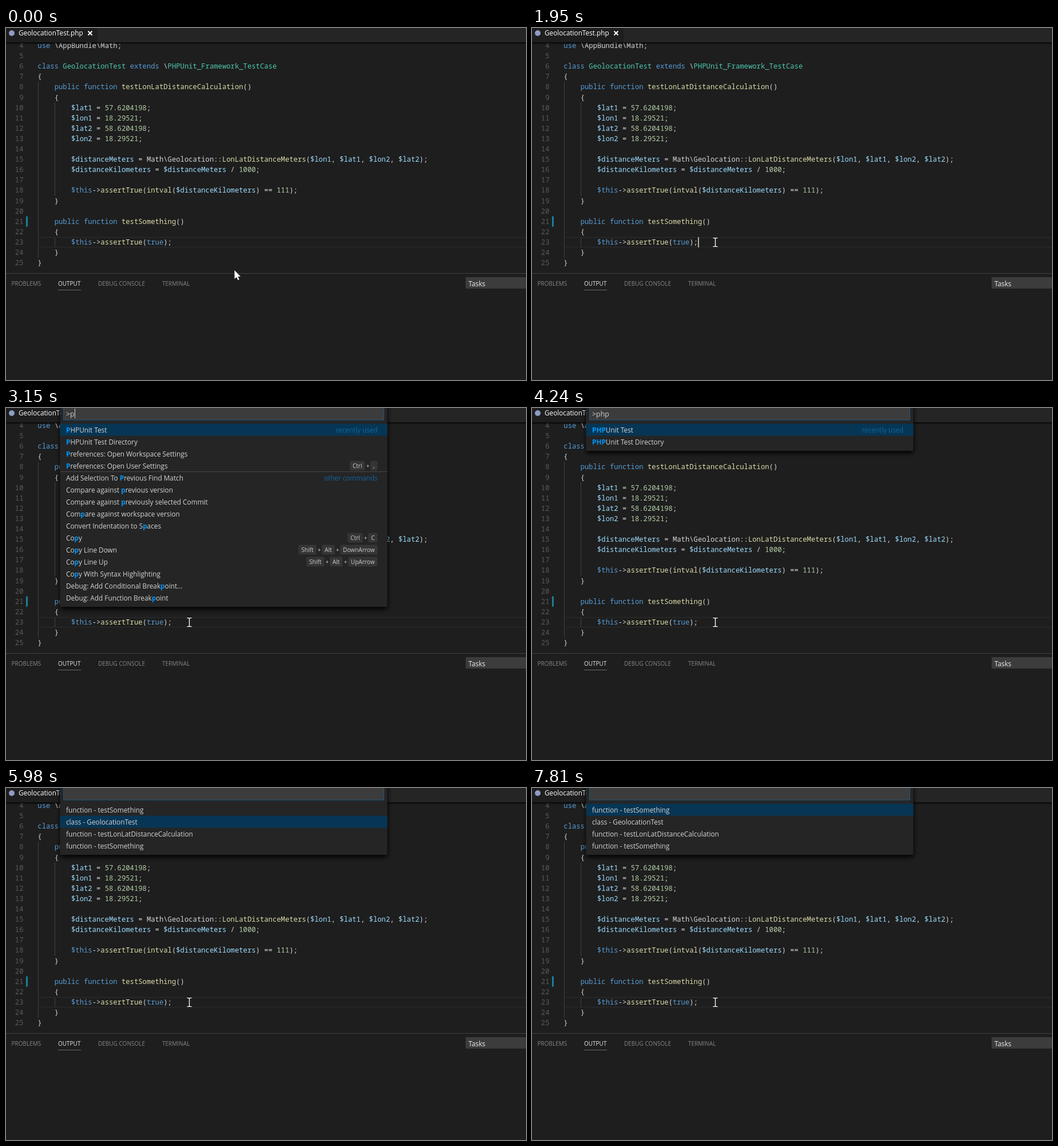
An HTML page with a canvas that plays this animation: 909x616 px, repeating every 8 s.

```html
<!DOCTYPE html>
<html lang="en">
<head>
<meta charset="utf-8">
<title>Editor test runner</title>
<style>
html, body { margin: 0; width: 100%; height: 100%; overflow: hidden; background: #1e1e1e; }
canvas { display: block; }
</style>
</head>
<body>
<canvas width="909" height="616"></canvas>
<script>
const LOOP = 8000;
const c = document.querySelector('canvas').getContext('2d');
const MONO = '12.222px "Noto Sans Mono", monospace';
const ui = (size, weight = 400) => `${weight} ${size}px "Open Sans", sans-serif`;

const FIRST_LINE = 4;
const CODE = String.raw`use \AppBundle\Math;

class GeolocationTest extends \PHPUnit_Framework_TestCase
{
    public function testLonLatDistanceCalculation()
    {
        $lat1 = 57.6204198;
        $lon1 = 18.29521;
        $lat2 = 58.6204198;
        $lon2 = 18.29521;

        $distanceMeters = Math\Geolocation::LonLatDistanceMeters($lon1, $lat1, $lon2, $lat2);
        $distanceKilometers = $distanceMeters / 1000;

        $this->assertTrue(intval($distanceKilometers) == 111);
    }

    public function testSomething()
    {
        $this->assertTrue(true);
    }
}`.split('\n');

// Groups: keyword, variable, class, function, number
const TOKEN = /(\b(?:use|class|extends|public|function|true)\b|\$this)|(\$\w+)|(GeolocationTest|PHPUnit_\w+)|(\w+(?=\())|(\b\d[\d.]*)|\w+|[^]/g;
const TOKEN_COLORS = ['#569cd6', '#9cdcfe', '#4ec9b0', '#dcdcaa', '#b5cea8'];

// Asterisks mark the matched letters
const COMMANDS = [
  ['*P*HPUnit Test'],
  ['*P*HPUnit Test Directory'],
  ['*P*references: Open Workspace Settings'],
  ['*P*references: Open User Settings', 'Ctrl', ','],
  ['Add Selection To *P*revious Find Match'],
  ['Compare against *p*revious version'],
  ['Compare against *p*reviously selected Commit'],
  ['Com*p*are against workspace version'],
  ['Convert Indentation to S*p*aces'],
  ['Co*p*y', 'Ctrl', 'C'],
  ['Co*p*y Line Down', 'Shift', 'Alt', 'DownArrow'],
  ['Co*p*y Line Up', 'Shift', 'Alt', 'UpArrow'],
  ['Co*p*y With Syntax Highlighting'],
  ['Debug: Add Conditional Break*p*oint...'],
  ['Debug: Add Function Break*p*oint']
];
const ALL = COMMANDS.map(([label, ...keys]) => [label.replaceAll('*', ''), ...keys]);
const MATCHES = [['*PHP*Unit Test'], ['*PHP*Unit Test Directory']];
const TESTS = [
  ['function - testSomething'], ['class - GeolocationTest'],
  ['function - testLonLatDistanceCalculation'], ['function - testSomething']
];

function rect(x, y, w, h, color) {
  c.fillStyle = color;
  c.fillRect(x, y, w, h);
}

function text(s, x, y, color, font, align = 'left') {
  c.font = font;
  c.fillStyle = color;
  c.textAlign = align;
  c.fillText(s, x, y);
  return x + c.measureText(s).width;
}

// Value of the last [time, value] step that has been reached
const at = (t, steps) => steps.filter(s => s[0] <= t).pop()[1];

function drawCode(caret) {
  rect(56, 94, 1, 308, '#404040');
  rect(85, 130, 1, 164, '#404040');
  rect(56, 366, 853, 1, '#2c2c2c');
  rect(56, 383, 853, 1, '#2c2c2c');
  rect(85, 367, 1, 16, '#404040');
  rect(35, 329.5, 3, 18, '#1b8098');
  CODE.forEach((line, i) => {
    const y = Math.round(35 + i * 18.1);
    text(i + FIRST_LINE, 30.5, y, '#5a5a5a', MONO, 'right');
    for (const m of line.matchAll(TOKEN)) {
      const kind = m.slice(1).findIndex(Boolean);
      text(m[0], 55.3 + m.index * 7.333, y, TOKEN_COLORS[kind] || '#d4d4d4', MONO);
    }
  });
  if (caret) rect(290, 366, 2, 18, '#aeafad');
}

function drawTabs() {
  rect(0, 0, 909, 25, '#252526');
  rect(0, 0, 160, 25, '#1e1e1e');
  const shade = c.createLinearGradient(0, 25, 0, 29);
  shade.addColorStop(0, '#000c');
  shade.addColorStop(1, '#0000');
  rect(0, 25, 909, 4, shade);
  c.fillStyle = '#8d9cc4';
  c.beginPath();
  c.arc(10, 9, 5, 0, 7);
  c.fill();
  text('GeolocationTest.php', 22, 13, '#fff', ui(11.75));
  c.strokeStyle = '#fff';
  c.lineWidth = 2;
  c.stroke(new Path2D('M143.5 5.5l7 7m0-7l-7 7'));
}

function drawPanel() {
  rect(0, 429, 909, 1, '#424242');
  [['PROBLEMS', 9.5], ['OUTPUT', 91], ['DEBUG CONSOLE', 161], ['TERMINAL', 273]].forEach(([s, x], i) =>
    text(s, x, 451, i == 1 ? '#e7e7e7' : '#858585', ui(10)));
  rect(91, 458, 40, 1, '#686868');
  rect(803.5, 436, 106, 20, '#3c3c3c');
  text('Tasks', 808.5, 452, '#f0f0f0', ui(11.75));
}

function drawKeys(keys, y) {
  let x = 649.5;
  keys.slice().reverse().forEach((key, i) => {
    if (i) {
      text('+', x - 4.5, y + 4, '#ccc', ui(10), 'center');
      x -= 9.5;
    }
    c.font = ui(10.1);
    const w = c.measureText(key).width + 10;
    x -= w;
    c.fillStyle = '#353536';
    c.beginPath();
    c.roundRect(x, y - 8.5, w, 17, 2.5);
    c.fill();
    text(key, x + 5, y + 4, '#ccc', ui(10.1));
  });
}

function drawPalette({ input, rows, selected, caret, scrollbar }) {
  const bottom = 33 + rows.length * 21;
  c.save();
  c.shadowColor = '#000';
  c.shadowBlur = 8;
  c.shadowOffsetY = 4;
  rect(94.5, -10, 572, bottom + 10, '#252526');
  c.restore();
  rect(100, -5, 561, 26.5, '#1c587f');
  rect(101, -5, 559, 25.5, '#3c3c3c');
  const end = text(input, 105, 15, '#ccc', ui(12.4));
  if (caret) rect(Math.round(end), 1, 1, 17, '#ccc');
  rect(94.5, 27.5 + selected * 21, 572, 21, '#073655');

  rows.forEach(([label, ...keys], i) => {
    const y = 38 + i * 21;
    let x = 105;
    label.split('*').forEach((part, j) => {
      x = text(part, x, y + 5, j % 2 ? '#0097fb' : '#d4d4d4', ui(11.8, j % 2 ? 700 : 400));
    });
    drawKeys(keys, y);
  });
  const group = (s, y) => text(s, 649.5, y, '#0f659f', ui(11.7), 'right');
  if (rows != TESTS) group('recently used', 43);
  if (rows.length > 4) {
    rect(94.5, 111, 572, 1, '#47474a');
    group('other commands', 127);
  }
  if (scrollbar) rect(658, 27.5, 8.5, 18, `rgba(121,121,121,${scrollbar})`);
}

function drawPointer(t) {
  if (t < 120) {
    c.fillStyle = '#fff';
    c.fill(new Path2D('M399.5 424v15l3.5-3 2.6 5.2 2.2-1-2.5-5.2h4.7z'));
    return;
  }
  // Six steps along a curve that rises a little above its end
  const p = Math.min(1, (Math.floor((t - 120) / 108) + 1) / 6);
  const x = Math.round(400 - 80 * p * (2 - p)) + .5;
  const y = Math.round(425 - 50 * p - 104 * p * (1 - p)) + .5;
  const beam = new Path2D(`M${x - 4} ${y - 8}h3l1 1 1-1h3M${x} ${y - 7}v14M${x - 4} ${y + 7}h3l1-1 1 1h3`);
  c.strokeStyle = '#000';
  c.lineWidth = 3;
  c.stroke(beam);
  c.strokeStyle = '#fff';
  c.lineWidth = 1.5;
  c.stroke(beam);
}

function paletteAt(t) {
  if (t < 2610 || t >= 4680 && t < 4910) return null;
  if (t < 4680) return {
    input: at(t, [[0, '>'], [2830, '>p'], [3270, '>php']]),
    rows: at(t, [[0, ALL], [3150, COMMANDS], [3270, MATCHES]]),
    selected: 0,
    caret: t < 4240,
    scrollbar: at(t, [[0, .4], [2830, .2], [2930, 0]])
  };
  return {
    input: '',
    rows: TESTS,
    selected: at(t, [[0, 0], [5870, 1], [6300, 2], [7060, 1], [7270, 0]]),
    caret: at(t, [[0, true], [5980, false], [6410, true], [6850, false], [7380, true], [7810, false]])
  };
}

function draw(t) {
  const palette = paletteAt(t);
  rect(0, 0, 909, 616, '#1e1e1e');
  drawCode(!palette && at(t, [[0, false], [970, true], [1520, false], [1950, true]]));
  drawTabs();
  drawPanel();
  if (palette) drawPalette(palette);
  drawPointer(t);
}

const start = performance.now();
function frame() {
  draw((performance.now() - start) % LOOP);
  requestAnimationFrame(frame);
}
frame();
</script>
</body>
</html>
```
